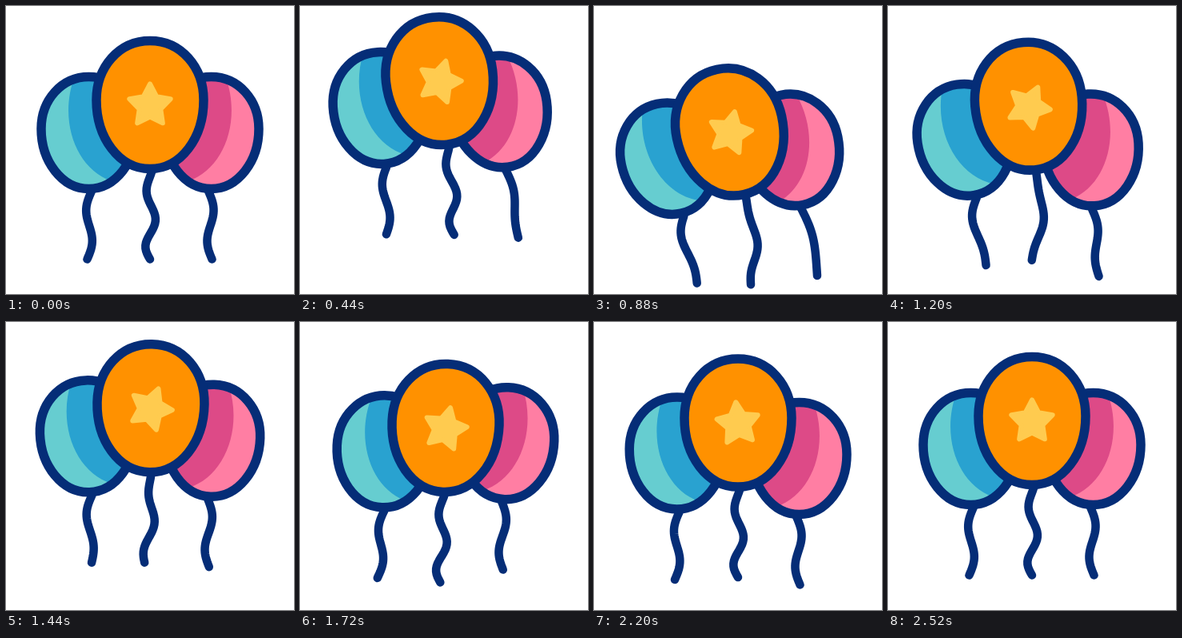
Recreate the animation shown at these times as an HTML page. Size 360 by 360 pixels, loop 2.56 s.

```html
<!DOCTYPE html>
<html lang="en">
<head>
<meta charset="utf-8">
<title>Balloons</title>
<style>
  html, body { margin: 0; width: 100%; height: 100%; overflow: hidden; background: #fff; }
  svg { display: block; width: 100vw; height: 100vh; }
  .line { fill: none; stroke: #052d77; stroke-linecap: round; stroke-linejoin: round; }
  .string { stroke-width: 10.5; }
  .rim { stroke-width: 11.5; }
  #star { fill: #ffcb4f; stroke: #ffcb4f; stroke-width: 6; stroke-linejoin: round; }
</style>
</head>
<body>
<svg viewBox="0 0 360 360">
  <defs>
    <path id="big" d="M0-80C39-80 67-47 67-6C67 41 39 80 0 80S-67 41-67-6C-67-47-39-80 0-80Z"/>
    <path id="small" d="M0-70C34-70 59.5-41 59.5-5C59.5 35 34 70 0 70S-59.5 35-59.5-5C-59.5-41-34-70 0-70Z"/>
    <path id="shade" d="M-18-70C-38-15-16 45 28 60L80 60V-80H-18Z"/>
    <clipPath id="clip"><use href="#small"/></clipPath>
  </defs>
  <g id="left">
    <path class="line string"/>
    <g class="body">
      <use href="#small" fill="#66cdd0"/>
      <g clip-path="url(#clip)"><use href="#shade" fill="#29a2d0"/></g>
      <use href="#small" class="line rim"/>
    </g>
  </g>
  <g id="right">
    <path class="line string"/>
    <g class="body">
      <use href="#small" fill="#ff7ea3"/>
      <g clip-path="url(#clip)"><use href="#shade" fill="#dd4a87" transform="scale(-1 1)"/></g>
      <use href="#small" class="line rim"/>
    </g>
  </g>
  <g id="middle">
    <path class="line string"/>
    <g class="body">
      <use href="#big" fill="#ff9100"/>
      <use href="#big" class="line rim"/>
    </g>
    <path id="star"/>
  </g>
</svg>
<script>
const LOOP = 2560;
const { sin, cos, PI } = Math;

// Swings from one extreme to the next with sine easing; stops are [time, value]
const swing = (...stops) => t => {
  const i = stops.findIndex(([time]) => time > t);
  if (i === 0) return stops[0][1];
  if (i < 0) return stops.at(-1)[1];
  const [t0, v0] = stops[i - 1], [t1, v1] = stops[i];
  return v0 + (v1 - v0) * (1 - cos(PI * (t - t0) / (t1 - t0))) / 2;
};

// Motions shared by all balloons, each followed with its own lag
const bounce = swing([0, 0], [400, -31], [880, 34], [1420, -16], [1890, 19], [2300, 0]);
const lean = swing([60, 0], [800, -12.5], [1600, 2.5], [2200, 0]);
const gust = swing([300, 0], [1120, 1], [1700, 0]);

const doubleCurl = s => -5 * sin(2 * PI * s);
const tripleCurl = s => -6 * sin(3 * PI * s ** 1.15);

// bend, whip and slack: how a gust bows, throws and straightens the string
const balloons = [
  {
    id: 'left', x: 103.5, y: 158.5, knot: [3, 74], length: 84, drift: -5,
    lag: { bounce: 50, lean: 130, gust: 0 },
    wave: doubleCurl, bend: -7, whip: 5, slack: 0.25
  },
  {
    id: 'right', x: 256.5, y: 158.5, knot: [-3, 74], length: 84, drift: 4,
    lag: { bounce: 140, lean: -60, gust: -300 },
    wave: s => -doubleCurl(s), bend: 6, whip: 0, slack: 0.9
  },
  {
    id: 'middle', x: 180, y: 123.5, knot: [2, 84], length: 109, drift: -2,
    lag: { bounce: 0, lean: 0, gust: 0 },
    wave: tripleCurl, bend: 11, whip: -11, slack: 0.7
  }
];

for (const b of balloons) {
  b.string = document.querySelector(`#${b.id} .string`);
  b.body = document.querySelector(`#${b.id} .body`);
}

const star = document.getElementById('star');
star.setAttribute('d', 'M' + Array.from({ length: 10 }, (_, i) => {
  const r = i % 2 ? 14 : 27, a = i * PI / 5;
  return `${r * sin(a)},${-r * cos(a)}`;
}).join('L') + 'Z');

// One full turn, slow at both ends
function spin(t) {
  const u = Math.min(t / 2480, 1);
  return 360 * u * u / (u * u + (1 - u) * (1 - u));
}

function place(b, t) {
  const tilt = lean(t - b.lag.lean), wind = gust(t - b.lag.gust);
  const x = b.x + 0.8 * tilt, y = b.y + bounce(t - b.lag.bounce);
  const a = tilt * PI / 180, [kx, ky] = b.knot;
  const x0 = x + kx * cos(a) - ky * sin(a);
  const y0 = y + kx * sin(a) + ky * cos(a);
  const sway = b.drift - 1.4 * tilt + b.whip * wind;
  const points = [];
  for (let i = 0; i <= 32; i++) {
    const s = i / 32;
    const dx = sway * s + b.bend * wind * sin(PI * s) + (1 - b.slack * wind) * b.wave(s);
    points.push(`${(x0 + dx).toFixed(2)},${(y0 + b.length * s).toFixed(2)}`);
  }
  b.string.setAttribute('d', 'M' + points.join('L'));
  b.body.setAttribute('transform', `translate(${x} ${y}) rotate(${tilt})`);
  return [x, y];
}

function draw() {
  const t = performance.now() % LOOP;
  let x, y;
  for (const b of balloons) [x, y] = place(b, t);
  star.setAttribute('transform', `translate(${x} ${y + 1}) rotate(${spin(t)})`);
  requestAnimationFrame(draw);
}
draw();
</script>
</body>
</html>
```
